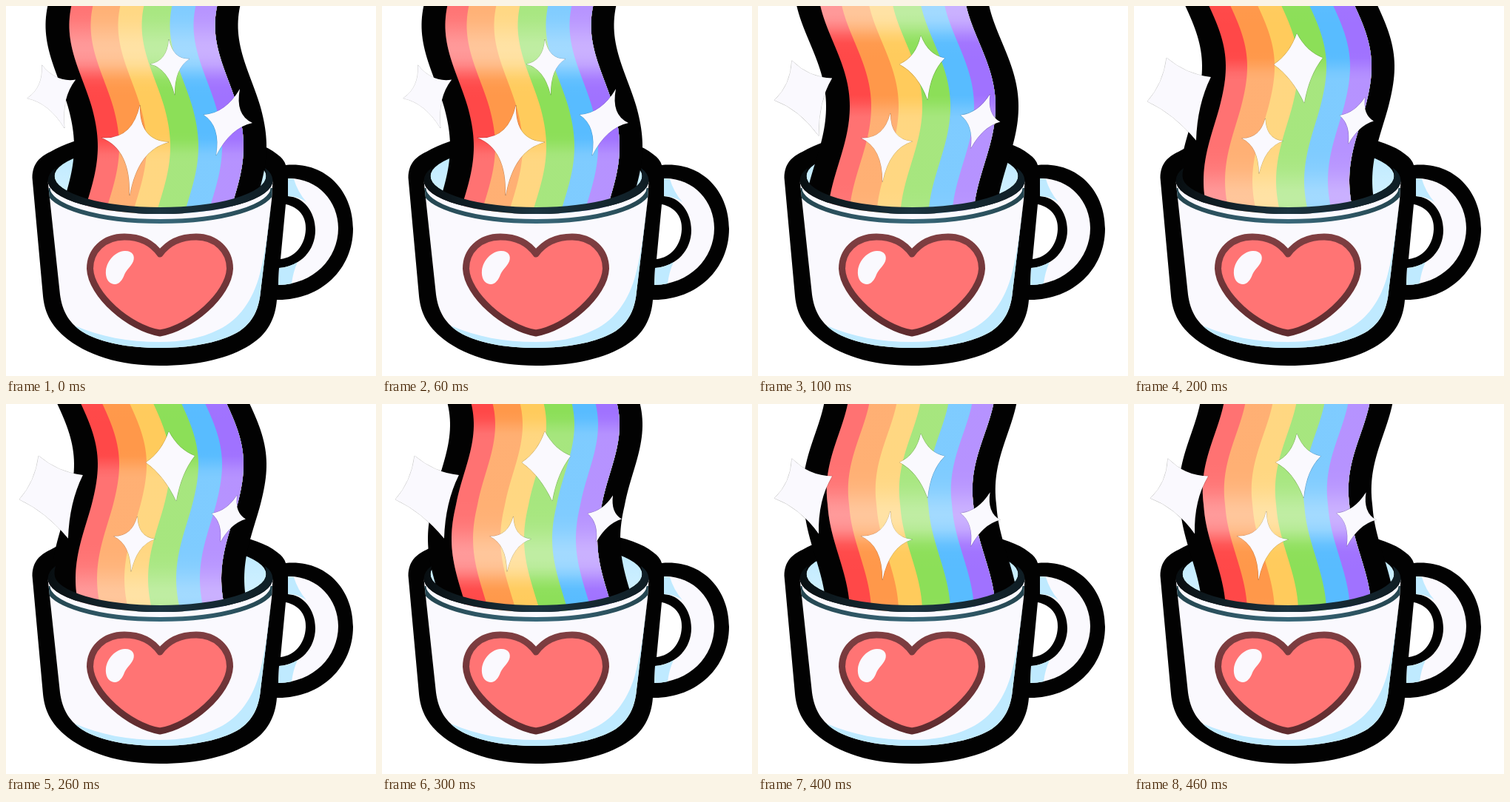
Write an HTML page with a canvas that moves like this. It is 500 px wide and 500 px high and loops after 0.5 s.

```html
<!DOCTYPE html>
<html lang="en">
<head>
<meta charset="utf-8">
<title>Rainbow mug</title>
<style>
  html, body { margin: 0; width: 100%; height: 100%; overflow: hidden; background: #fff; }
  canvas { display: block; width: 500px; height: 500px; }
</style>
</head>
<body>
<canvas id="stage"></canvas>
<script>
const STEP = 100, COUNT = 5;
const DEPTH = 280;               // lowest y of the rainbow, hidden by the mug
const WAVE = 308, RISE = 54;     // wavelength, and climb per step
const WHITE = '#faf9fe', BLUE = '#bfeaff', BLACK = '#020202';

const canvas = document.getElementById('stage');
const ratio = window.devicePixelRatio || 1;
canvas.width = canvas.height = 500 * ratio;
const ctx = canvas.getContext('2d');
ctx.scale(ratio, ratio);

const bands = ['#ff4848', '#ff984a', '#ffcb5c', '#8cdf58', '#58bcff', '#a072ff'];
const edges = [0, 29, 66, 98, 136, 168, 197];

// Tips run top, right, bottom, left at full size; grow and pinch are [rest, change at the peak]
const stars = [
  { at: [63, 111], tips: [[44, 70], [104, 96], [84, 182], [18, 129]], grow: [.76, .25], pinch: [.5, -.24] },
  { at: [220, 77], tips: [[220, 37], [255, 70], [230, 131], [189, 79]], grow: [.8, .21], pinch: [.7, -.4] },
  { at: [172, 180], tips: [[181, 134], [220, 184], [167, 256], [129, 178]], grow: [1, -.41], pinch: [.8, -.1] },
  { at: [303, 150], tips: [[316, 112], [333, 158], [284, 202], [267, 147]], grow: [1, -.32], pinch: [.62, -.1] }
];

const shapes = {
  shadow: `M35.5 232 C36 213 45 204 60 197 C96 176 150 168 208 168 C270 168 340 178 366 200
    Q376 207 378 215 C432 210 469 250 469 301 C469 356 425 398 366 397
    C364 422 354 443 330 458 C302 476 260 486 208 486 C154 486 108 472 78 446
    C59 429 52 412 50 392 Z`,
  hole: 'M378 268 C397 272 406 286 405 302 C404 324 390 340 371 342 Z',
  handle: `M381 233 C421 232 449 264 449 300 C449 342 415 376 368 377 L369 354
    C398 352 418 330 418 303 C418 278 402 258 381 257 Z`,
  handleTop: 'M381 233 L389 234 Q394 251 406 265 Q395 257 381 257 Z',
  handleLow: 'M369 354 Q383 353 394 346 Q388 359 386 375 Q378 377 368 377 Z',
  body: `M56.5 236 A152 45 0 0 0 360.5 236 L359 262 L344 386 C341 420 325 438 298 448
    C272 458 240 462 208 462 C165 462 131 455 108 443 C85 430 76 412 73 390 Z`,
  shade: `M361 255 C354 292 352 330 343 362 C334 397 315 424 288 437 C262 450 235 454 208 454
    C165 454 128 447 93 432 L100 470 L330 470 L370 390 Z`,
  rim: `M56.5 236 A152 45 0 0 0 360.5 236 Q360 226 350 219 Q352 225 351.5 230
    A143 42 0 0 1 65.5 230 Q65 225 67 219 Q57 226 56.5 236 Z`,
  stripe: 'M56.5 246 A152 45 0 0 0 360.5 246',
  heart: `M208 335 C196 318 178 312 160 312 C132 312 113.5 331 113.5 355
    C115 390 166 435 208 442 C250 435 301 390 302.5 355
    C302.5 330 283 312 257 312 C236 312 219 320 208 335 Z`,
  gleam: `M160 331 C170 330 175 337 172 345 C169 352 163 356 160 363 C157 371 152 377 146 376
    C138 375 134 367 135 357 C137 343 148 332 160 331 Z`
};
for (const key in shapes) shapes[key] = new Path2D(shapes[key]);

function fill(path, color) {
  ctx.fillStyle = color;
  ctx.fill(path);
}

function stroke(path, color, width) {
  ctx.strokeStyle = color;
  ctx.lineWidth = width;
  ctx.stroke(path);
}

function blend(x0, y0, x1, y1, colors) {
  const g = ctx.createLinearGradient(x0, y0, x1, y1);
  colors.forEach((c, i) => g.addColorStop(i / (colors.length - 1), c));
  return g;
}

const crestAt = step => 190 - RISE * step;

// Left edge of the rainbow: a climbing cosine that swings wider near the top
function edgeAt(y, step) {
  const swing = Math.max(15, 20.5 - y / 25);
  return 124 - swing * (1 - Math.cos(2 * Math.PI * (y - crestAt(step)) / WAVE));
}

// Distance from y to the nearest repeat of a spot riding on the wave
function gap(y, spot) {
  const d = (y - spot) / WAVE;
  return Math.abs(d - Math.round(d)) * WAVE;
}

// White over the bands: none on the deep part, most in a soft pale spot
function shineAt(y, step) {
  const crest = crestAt(step);
  const t = Math.min(1, Math.max(0, (gap(y, crest - 50) - 33) / 34));
  const glow = Math.exp(-((gap(y, crest - 132) / 32) ** 2));
  return .23 * t * t * (3 - 2 * t) + .22 * glow;
}

function ribbon(step, from, to) {
  const path = new Path2D();
  for (let y = -5; y <= DEPTH; y += 5) path.lineTo(edgeAt(y, step) + from, y);
  for (let y = DEPTH; y >= -5; y -= 5) path.lineTo(edgeAt(y, step) + to, y);
  path.closePath();
  return path;
}

function drawRainbow(step) {
  const right = edges[bands.length];
  fill(ribbon(step, -32, right + 31), BLACK);
  // Each band reaches the far side, so the next one covers it without a seam
  bands.forEach((color, i) => fill(ribbon(step, edges[i], right), color));
  const veil = [];
  for (let y = 0; y <= DEPTH; y += 10) veil.push(`rgba(255,255,255,${shineAt(y, step).toFixed(3)})`);
  fill(ribbon(step, 0, right), blend(0, 0, 0, DEPTH, veil));
}

function drawStar({ at, tips, grow, pinch }, step) {
  const pulse = Math.sin(Math.PI * step / COUNT);
  const size = grow[0] + grow[1] * pulse;
  const bend = pinch[0] + pinch[1] * pulse;
  const pts = tips.map(tip => tip.map((v, k) => at[k] + (v - at[k]) * size));
  const mid = [0, 1].map(k => pts.reduce((sum, p) => sum + p[k], 0) / 4);
  const path = new Path2D();
  path.moveTo(...pts[0]);
  pts.forEach((p, i) => {
    const next = pts[(i + 1) % 4];
    const pull = mid.map((m, k) => {
      const half = (p[k] + next[k]) / 2;
      return half + (m - half) * bend;
    });
    path.quadraticCurveTo(...pull, ...next);
  });
  path.closePath();
  stroke(path, 'rgba(0,0,0,.3)', .7);
  fill(path, WHITE);
}

function drawMug() {
  fill(shapes.body, WHITE);
  ctx.save();
  ctx.clip(shapes.body);
  fill(shapes.shade, BLUE);
  stroke(shapes.stripe, blend(57, 0, 360, 0, ['#24454f', '#39687a', '#24454f']), 6);
  ctx.restore();
  fill(shapes.rim, blend(57, 0, 360, 0, ['#080e11', '#1b3440', '#0f1d24']));

  fill(shapes.handle, WHITE);
  fill(shapes.handleTop, BLUE);
  fill(shapes.handleLow, BLUE);

  fill(shapes.heart, '#ff7474');
  ctx.lineJoin = 'round';
  stroke(shapes.heart, blend(0, 308, 0, 446, ['#803f42', '#5e2b2e']), 9);
  fill(shapes.gleam, WHITE);
}

function drawScene(step) {
  ctx.fillStyle = '#fff';
  ctx.fillRect(0, 0, 500, 500);
  fill(shapes.shadow, BLACK);
  fill(shapes.hole, '#fff');
  ctx.beginPath();
  ctx.ellipse(208.5, 230, 143, 42, 0, 0, 2 * Math.PI);
  ctx.fillStyle = blend(0, 200, 0, 262, [BLUE, '#d2f1ff']);
  ctx.fill();
  drawRainbow(step);
  drawMug();
  stars.forEach(star => drawStar(star, step));
}

let shown = -1;
function tick() {
  const step = Math.floor(performance.now() / STEP) % COUNT;
  if (step !== shown) drawScene(shown = step);
  requestAnimationFrame(tick);
}
tick();
</script>
</body>
</html>
```
